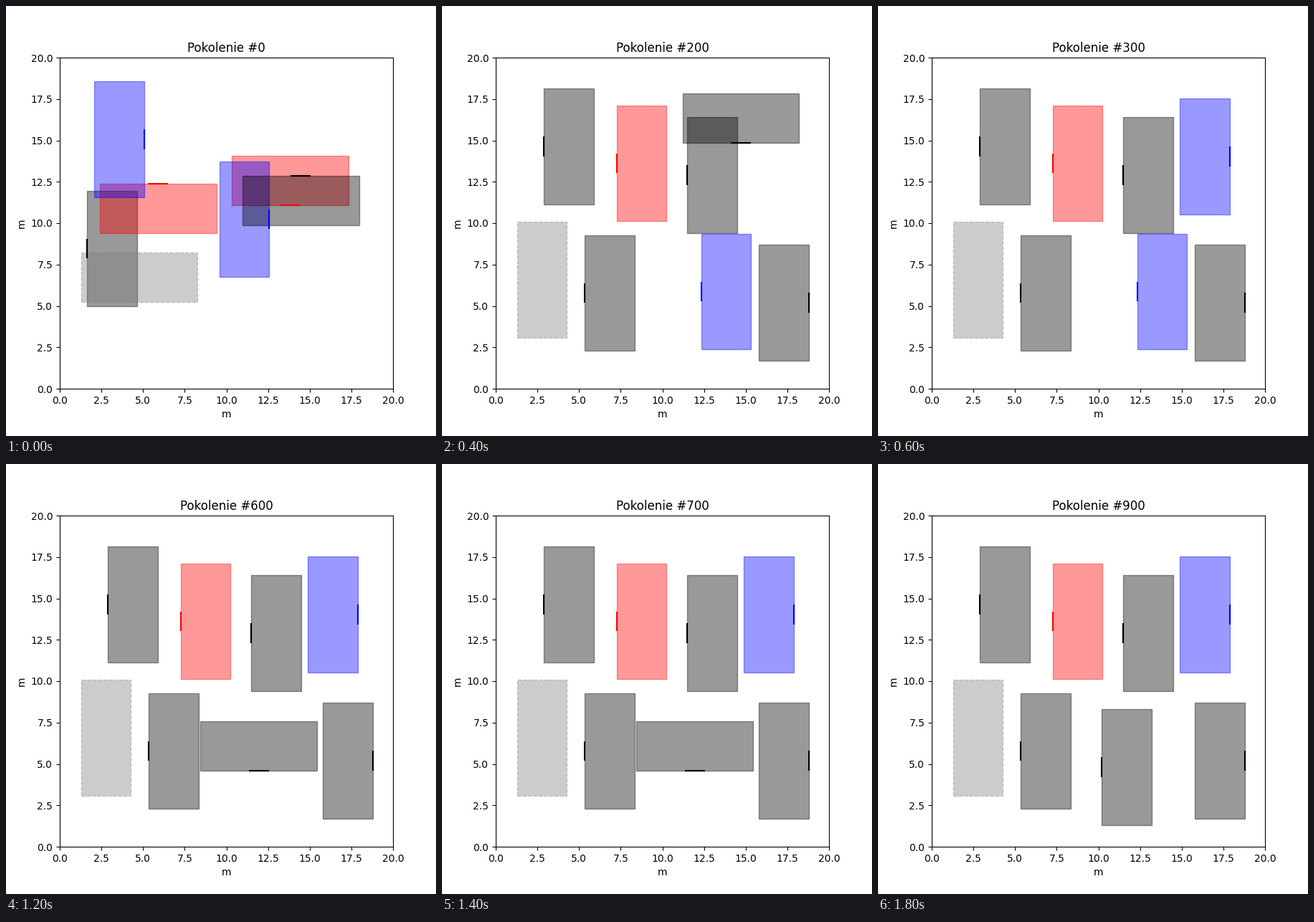
A matplotlib script that plays this animation: 600x600 px, repeating every 2 s.

```python
import matplotlib.pyplot as plt
from matplotlib.animation import FuncAnimation
from matplotlib.patches import Rectangle

SHORT, LONG, DOOR = 3, 7, 1.2

# Each block: colour, left, bottom, side of the door.
# A door on the left or right means the block stands upright.
START = [
    ("black", 1.634, 4.96, "L"),
    ("red", 2.41, 9.39, "T"),
    ("blue", 2.07, 11.56, "R"),
    ("red", 10.33, 11.08, "B"),
    ("blue", 9.575, 6.735, "R"),
    ("black", 10.97, 9.87, "T"),
]
SETTLED = [
    ("black", 2.88, 11.13, "L"),
    ("red", 7.25, 10.12, "L"),
    ("black", 11.49, 9.39, "L"),
    ("black", 5.34, 2.28, "L"),
    ("black", 15.79, 1.70, "R"),
]
LOWER = [
    (1, ("blue", 12.33, 2.37, "L")),
    (4, ("black", 8.44, 4.58, "B")),
    (8, ("black", 10.20, 1.30, "L")),
]
UPPER = [
    (1, ("red", 15.71, 4.37, "R")),
    (2, ("black", 11.21, 14.84, "B")),
    (3, ("blue", 14.89, 10.52, "R")),
]

fig, ax = plt.subplots(figsize=(6, 6), dpi=100)


def latest(steps, i):
    return [block for start, block in steps if start <= i][-1]


def layout(i):
    if i == 0:
        return START
    return SETTLED + [latest(LOWER, i), latest(UPPER, i)]


def add_box(color, x, y, w, h, style="-"):
    ax.add_patch(Rectangle((x, y), w, h, facecolor=color, edgecolor=color,
                           alpha=0.4, linestyle=style))


def add_block(color, x, y, side):
    upright = side in "LR"
    w, h = (SHORT, LONG) if upright else (LONG, SHORT)
    add_box(color, x, y, w, h)
    if upright:
        edge = x + w * (side == "R")
        mid = y + h / 2
        xs, ys = [edge, edge], [mid - DOOR / 2, mid + DOOR / 2]
    else:
        edge = y + h * (side == "T")
        mid = x + w / 2
        xs, ys = [mid - DOOR / 2, mid + DOOR / 2], [edge, edge]
    ax.plot(xs, ys, color=color, lw=1.5, solid_capstyle="butt")


def draw(i):
    ax.clear()
    ax.set(xlim=(0, 20), ylim=(0, 20), xlabel="m", ylabel="m",
           title=f"Pokolenie #{100 * i}")
    for block in layout(i):
        add_block(*block)
    if i == 0:
        add_box("gray", 1.27, 5.22, LONG, SHORT, "--")
    else:
        add_box("gray", 1.27, 3.07, SHORT, LONG, "--")


anim = FuncAnimation(fig, draw, frames=10, init_func=lambda: None,
                     interval=200, repeat=True)
plt.show()
```
